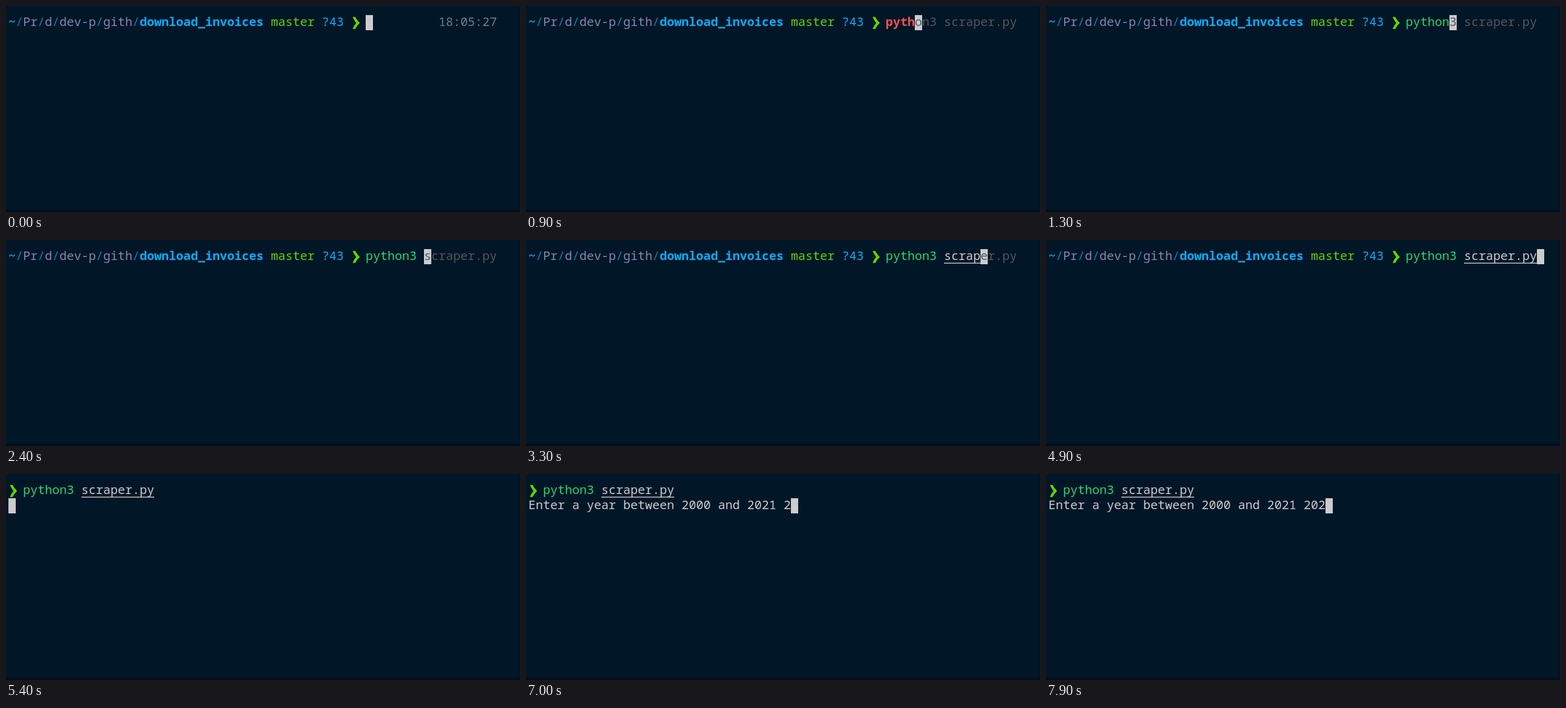
These frames come from a looping animation (846 px wide and 340 px high, 8000 ms). An HTML page:

```html
<!DOCTYPE html>
<html lang="en">
<head>
<meta charset="utf-8">
<title>Terminal session</title>
<style>
  html, body { margin: 0; width: 100%; height: 100%; overflow: hidden; background: #011627; }
  svg { display: block; width: 846px; height: 340px; }
  text { font: 20px "Noto Sans Mono", "DejaVu Sans Mono", monospace; white-space: pre; font-variant-ligatures: none; }
  .bold { font-weight: 700; }
</style>
</head>
<body>
<svg viewBox="0 0 846 340">
  <rect width="846" height="340" fill="#011627"/>
  <rect x="843" width="3" height="340" fill="#011423"/>
  <rect y="336" width="846" height="4" fill="#000f1d"/>
  <g id="screen"></g>
</svg>
<script>
const LOOP = 8000, CELL = 12, LEFT = 4, TOP = 15, ROW = 25;
const COMMAND = "python3 scraper.py", ARG_START = 8;
const QUESTION = "Enter a year between 2000 and 2021 ", ANSWER = "202";
const RUN_AT = 5400, ASK_AT = 6000;
// Key press times, one per character
const COMMAND_KEYS = [400, 700, 800, 900, 1100, 1300, 1900, 2400, 2600,
  2800, 3000, 3100, 3300, 3500, 3600, 4400, 4600, 4900];
const ANSWER_KEYS = [7000, 7700, 7900];
const C = {
  path: "#8787af", slash: "#0087af", blue: "#00afff", lime: "#5fd700", clock: "#5f8787",
  error: "#ef5350", valid: "#22da6e", hint: "#575656", text: "#cccccc", covered: "#4a586c"
};
const screen = document.getElementById("screen");

const colX = col => LEFT + col * CELL;
const pressed = (keys, t) => keys.filter(k => k <= t).length;

function run(col, row, str, fill, bold) {
  return `<text x="${colX(col)}" y="${TOP + 18 + row * ROW}" fill="${fill}"${bold ? ' class="bold"' : ""}>${str}</text>`;
}

function cursor(col, row, char = "") {
  return `<rect x="${colX(col)}" y="${TOP + row * ROW}" width="${CELL}" height="${ROW}" fill="${C.text}"/>`
    + run(col, row, char, C.covered);
}

function arrow(col) {
  return `<path transform="translate(${colX(col)} 0)" fill="${C.lime}"
    d="M2.6 18H6.8Q9.4 23.6 14.3 28Q9.4 32.4 6.8 38H2.6Q4.6 32.2 8.4 28Q4.6 23.8 2.6 18Z"/>`;
}

function prompt() {
  let col = 0, out = "";
  const add = (str, fill, bold) => { out += run(col, 0, str, fill, bold); col += str.length; };
  add("~", C.blue, true);
  for (const dir of ["Pr", "d", "dev-p", "gith"]) {
    add("/", C.slash);
    add(dir, C.path);
  }
  add("/", C.slash);
  add("download_invoices", C.blue, true);
  add(" master", C.lime);
  add(" ?43", C.blue);
  return out + arrow(47);
}

function command(col, count) {
  const word = COMMAND.slice(0, Math.min(count, ARG_START - 1));
  const known = count >= 6;
  let out = run(col, 0, word, known ? C.valid : C.error, !known);
  if (count > ARG_START) {
    const arg = COMMAND.slice(ARG_START, count), start = col + ARG_START;
    out += run(start, 0, arg, C.text)
      + `<rect x="${colX(start)}" y="37.5" width="${arg.length * CELL}" height="1.4" fill="${C.text}"/>`;
  }
  return out;
}

function typingView(count) {
  const col = 49;
  if (!count) return prompt() + cursor(col, 0) + run(59, 0, "18:05:27", C.clock);
  const at = col + count;
  return prompt() + command(col, count)
    + cursor(at, 0, COMMAND.charAt(count))
    + run(at + 1, 0, COMMAND.slice(count + 1), C.hint);
}

function runningView(line) {
  return arrow(0) + command(2, COMMAND.length)
    + run(0, 1, line, C.text) + cursor(line.length, 1);
}

function view(t) {
  if (t < RUN_AT) return typingView(pressed(COMMAND_KEYS, t));
  return runningView(t < ASK_AT ? "" : QUESTION + ANSWER.slice(0, pressed(ANSWER_KEYS, t)));
}

let shown = "", start;
function frame(now) {
  start ??= now;
  const next = view((now - start) % LOOP);
  if (next !== shown) screen.innerHTML = shown = next;
  requestAnimationFrame(frame);
}
screen.innerHTML = shown = view(0);
requestAnimationFrame(frame);
</script>
</body>
</html>
```
